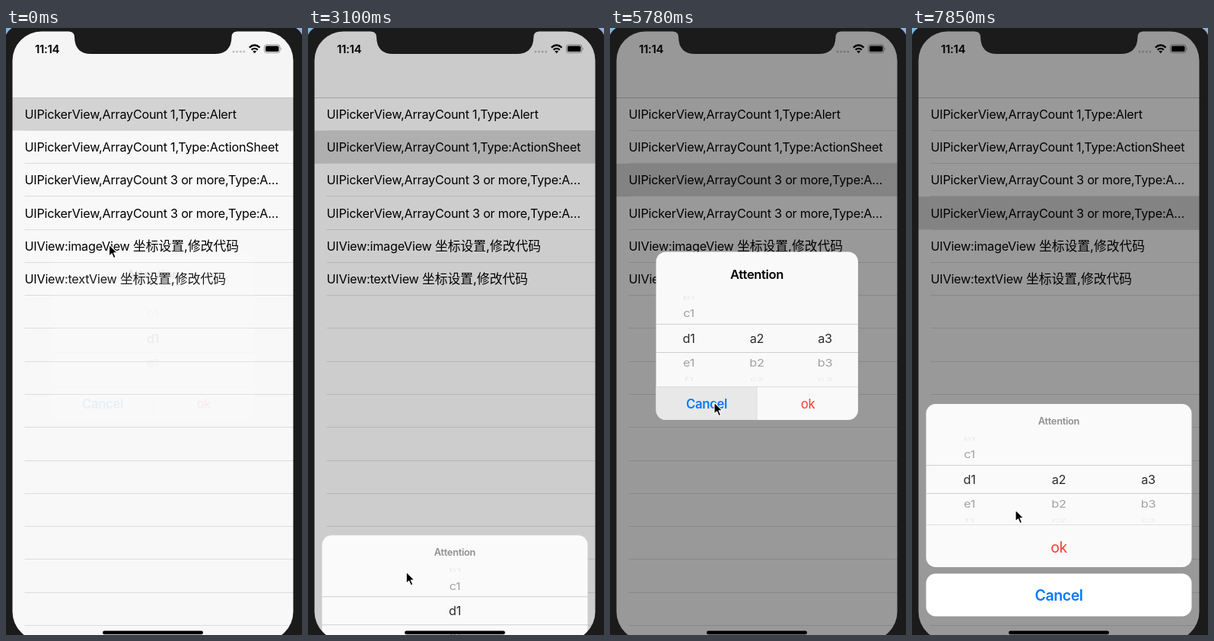
Write an HTML page that moves like this. It is 389 px wide and 796 px high and loops after 8 s.

```html
<!DOCTYPE html>
<html lang="en">
<head>
<meta charset="utf-8">
<title>Picker demo</title>
<style>
  html, body { margin: 0; width: 100%; height: 100%; overflow: hidden; background: #1b1b1c; }
  svg { display: block; width: 100vw; height: 100vh; }
  text { font-family: Inter, "Noto Sans CJK SC", "Noto Sans CJK JP", "Noto Sans CJK", sans-serif; letter-spacing: -.02em; }
  .row { letter-spacing: -.014em; }
  .cjk { font-size: 16.8px; letter-spacing: 0; }
</style>
</head>
<body>
<svg id="stage" viewBox="0 0 389 796" xmlns="http://www.w3.org/2000/svg"></svg>
<script>
const LOOP = 8000;
const STEPS = 54;
const STEP = LOOP / STEPS;
const EARLY = 12; // refreshes come slightly ahead of the even grid
const ROW = 43.27;
const LIST_TOP = 91.5;

// Pointer stops: it leaves at one time and reaches x, y at another.
const STOPS = [
  { leave: -450, arrive: -200, x: 134, y: 330 },
  { leave: -300, arrive: 600, x: 140, y: 153 },
  { leave: 1150, arrive: 1570, x: 125, y: 447 },
  { leave: 1920, arrive: 2370, x: 147, y: 723 },
  { leave: 2670, arrive: 3080, x: 129, y: 715 },
  { leave: 3080, arrive: 4000, x: 190, y: 205 },
  { leave: 4340, arrive: 4890, x: 151, y: 355 },
  { leave: 5040, arrive: 5480, x: 137, y: 491 },
  { leave: 5920, arrive: 6360, x: 163, y: 235 },
  { leave: 7250, arrive: 7850, x: 136, y: 632 }];

const picking = 'UIPickerView,ArrayCount ';
const cjk = ' <tspan class="cjk">坐标设置,修改代码</tspan>';
const ITEMS = [
  picking + '1,Type:Alert', picking + '1,Type:ActionSheet',
  picking + '3 or more,Type:A…', picking + '3 or more,Type:A…',
  'UIView:imageView' + cjk, 'UIView:textView' + cjk];

const repeat = (n, fn) => Array.from({ length: n }, (_, i) => fn(i)).join('');
const rect = (x, y, w, h, fill, extra = '') =>
  `<rect x="${x}" y="${y}" width="${w}" height="${h}" fill="${fill}" ${extra}/>`;
const label = (x, y, str, size, fill = '#000', weight = 400, extra = 'text-anchor="middle"') =>
  `<text x="${x}" y="${y + size * .362}" font-size="${size}" fill="${fill}" font-weight="${weight}" ${extra}>${str}</text>`;

// Entries sit on a drum: they flatten and fade with the angle from the middle.
function wheel(x, y, letters, digit) {
  return [...letters].map((letter, i) => {
    const angle = (i - 2) * .6;
    const squash = Math.cos(angle);
    const opacity = i === 2 ? .82 : .52 * squash ** 2;
    return letter === ' ' ? '' :
      `<g transform="translate(${x} ${y + 57.5 * Math.sin(angle)}) scale(1 ${squash})" opacity="${opacity}">` +
      label(0, 0, letter + digit, 16.3) + '</g>';
  }).join('');
}

const wheels = (columns, y) => columns.map((x, i) =>
  wheel(x, y, i ? '  abc' : 'bcdef', i + 1)).join('');

function picker(id, gap, y, left, width) {
  const line = dy => rect(left, y + dy, width, 1, '#cfcfcf');
  return line(-19) + line(18) +
    `<g id="${id}One">${wheels([193], y)}</g>
     <g id="${id}Three">${wheels([193 - gap, 193, 193 + gap], y)}</g>`;
}

const list =
  rect(0, 0, 389, LIST_TOP, '#fcfcfc') +
  rect(0, 0, 389, ROW, '#d9d9d9', 'id="selected"') +
  rect(0, 91, 389, 1, '#cbcbcd') +
  repeat(16, i => rect(24.5, Math.round(LIST_TOP + (i + 1) * ROW - .9), 365, 1, '#e2e2e4')) +
  ITEMS.map((str, i) => label(24.5, 113 + i * ROW, str, 16.2, '#000', 400, 'class="row"')).join('');

const status =
  label(38, 27.3, '11:14', 15, '#000', 600, '') +
  repeat(4, i => `<circle cx="${299 + i * 4.6}" cy="31" r="1.5" opacity=".22"/>`) +
  `<path d="M319.8 25.6Q326.7 19.4 333.6 25.6M322.6 28.6Q326.7 25 330.8 28.6" fill="none" stroke="#000" stroke-width="2.2"/>
  <path d="M324.3 30.6Q326.7 28.8 329.1 30.6L326.7 33.2Z"/>
  <rect x="339.5" y="22" width="20.5" height="10.5" rx="3" fill="none" stroke="#000" stroke-opacity=".4"/>
  <rect x="341" y="23.5" width="17.5" height="7.5" rx="1.7"/>
  <path d="M361.2 25.4Q363 27.2 361.2 29Z" opacity=".4"/>`;

const sheet = `<g id="sheet">
  ${rect(18.5, 493, 349, 214, '#fafafa', 'rx="12.5"')}
  ${label(193, 515, 'Attention', 12.8, '#8f8f8f', 600)}
  ${picker('sheet', 117.5, 592, 18.5, 349)}
  ${rect(18.5, 651, 349, 1, '#e0e0e0')}
  ${label(193, 680.5, 'ok', 19.5, '#ff3b30')}
  ${rect(18.5, 715.5, 349, 56, '#fff', 'id="sheetCancel" rx="12.5"')}
  ${label(193, 744, 'Cancel', 19.5, '#007aff', 600)}</g>`;

const alertBox = `<g id="alert">
  ${rect(60.5, 293.5, 265.5, 220.5, '#f9f9f9', 'id="alertPanel" rx="13"')}
  <g id="alertContent">
    <path id="alertPress" d="M60.5 471H193V514H73.5A13 13 0 0 1 60.5 501Z" fill="#e8e8e8"/>
    ${label(193, 323.5, 'Attention', 16.5, '#000', 600)}
    ${picker('alert', 89.5, 407, 60.5, 265.5)}
    ${rect(60.5, 470, 265.5, 1, '#dcdcdc')}${rect(192.5, 471, 1, 43, '#dcdcdc')}
    ${label(127, 492.5, 'Cancel', 16.7, '#007aff', 600)}
    ${label(260, 492.5, 'ok', 16.7, '#ff3b30')}
  </g></g>`;

// The phone body covers everything outside its screen opening.
const body = `
  <path fill-rule="evenodd" fill="#1b1b1c" d="M0 0H389V796H0Z
    M46.5 4.5H339.5A38 38 0 0 1 377.5 42.5V765.5A38 38 0 0 1 339.5 803.5H46.5A38 38 0 0 1 8.5 765.5V42.5A38 38 0 0 1 46.5 4.5Z"/>
  <path d="M83 4H303V4.5Q296.5 5 296.5 12Q296 34 274 34H112Q90.5 34 90 12Q90 5 83 4.5Z" fill="#1b1b1c"/>
  <path d="M0 0H8Q3 3 0 9Z" fill="#78b9e2"/>
  <path d="M389 0H381Q386 3 389 9Z" fill="#93add6"/>`;

document.getElementById('stage').innerHTML = `
  ${rect(0, 0, 389, 796, '#fff')}
  ${list}${status}
  ${rect(0, 0, 389, 796, '#000', 'id="dim"')}
  ${sheet}${alertBox}
  ${rect(127, 790.5, 132, 4.8, '#000', 'rx="2.4"')}
  ${body}
  <path id="pointer" d="M0 0V15L3.5 11.8L6 17.6L8.6 16.5L6.1 10.8H10.8Z" stroke="#fff" stroke-width="1.1" stroke-linejoin="round"/>`;

const el = id => document.getElementById(id);
const set = (id, name, value) => el(id).setAttribute(name, value);
const show = (id, on) => el(id).style.display = on ? '' : 'none';
const within = (t, from, to) => t >= from && t < to;

// Critically damped spring, settled once the rest is invisible.
function spring(ms) {
  const x = Math.max(0, ms) * .016;
  const value = 1 - (1 + x) * Math.exp(-x);
  return value > .985 ? 1 : value;
}

const openBetween = (t, from, to) => spring(t - from) - spring(t - to);

function smooth(t, from, to) {
  const u = Math.min(1, Math.max(0, (t - from) / (to - from)));
  return u * u * (3 - 2 * u);
}

function pointerAt(t) {
  return STOPS.reduce(([x, y], stop) => {
    const k = smooth(t, stop.leave, stop.arrive);
    return [x + (stop.x - x) * k, y + (stop.y - y) * k];
  }, [STOPS[0].x, STOPS[0].y]);
}

function render(t) {
  const row = [890, 4290, 6960].filter(start => t + EARLY >= start).length;
  set('selected', 'y', LIST_TOP + row * ROW - .2);

  const up = openBetween(t, 1167, 3004) + openBetween(t, 7190, Infinity);
  const open = openBetween(t, -LOOP, -272) + openBetween(t, 4504, 5948);
  set('dim', 'opacity', .4 * Math.max(up, open));

  show('sheet', up > 0);
  set('sheet', 'transform', `translate(0 ${(1 - up) * 337})`);
  set('sheetCancel', 'fill', within(t, 2660, 2960) ? '#e8e8e8' : '#fff');
  show('sheetOne', t < LOOP / 2);
  show('sheetThree', t >= LOOP / 2);

  show('alert', open > 0);
  const scale = within(t, 4504, 5948) ? 1.2 - .2 * open : 1;
  set('alert', 'transform', `translate(193 404) scale(${scale}) translate(-193 -404)`);
  set('alertPanel', 'opacity', Math.min(1, open * 1.45));
  set('alertContent', 'opacity', open);
  show('alertPress', within(t, 5770, 5948));
  show('alertOne', t < LOOP / 2);
  show('alertThree', t >= LOOP / 2);

  set('pointer', 'transform', `translate(${pointerAt(t)})`);
}

const begin = performance.now();
function tick() {
  const t = (performance.now() - begin) % LOOP;
  render(Math.min(STEPS - 1, Math.floor((t + EARLY) / STEP)) * STEP);
  requestAnimationFrame(tick);
}
tick();
</script>
</body>
</html>
```
